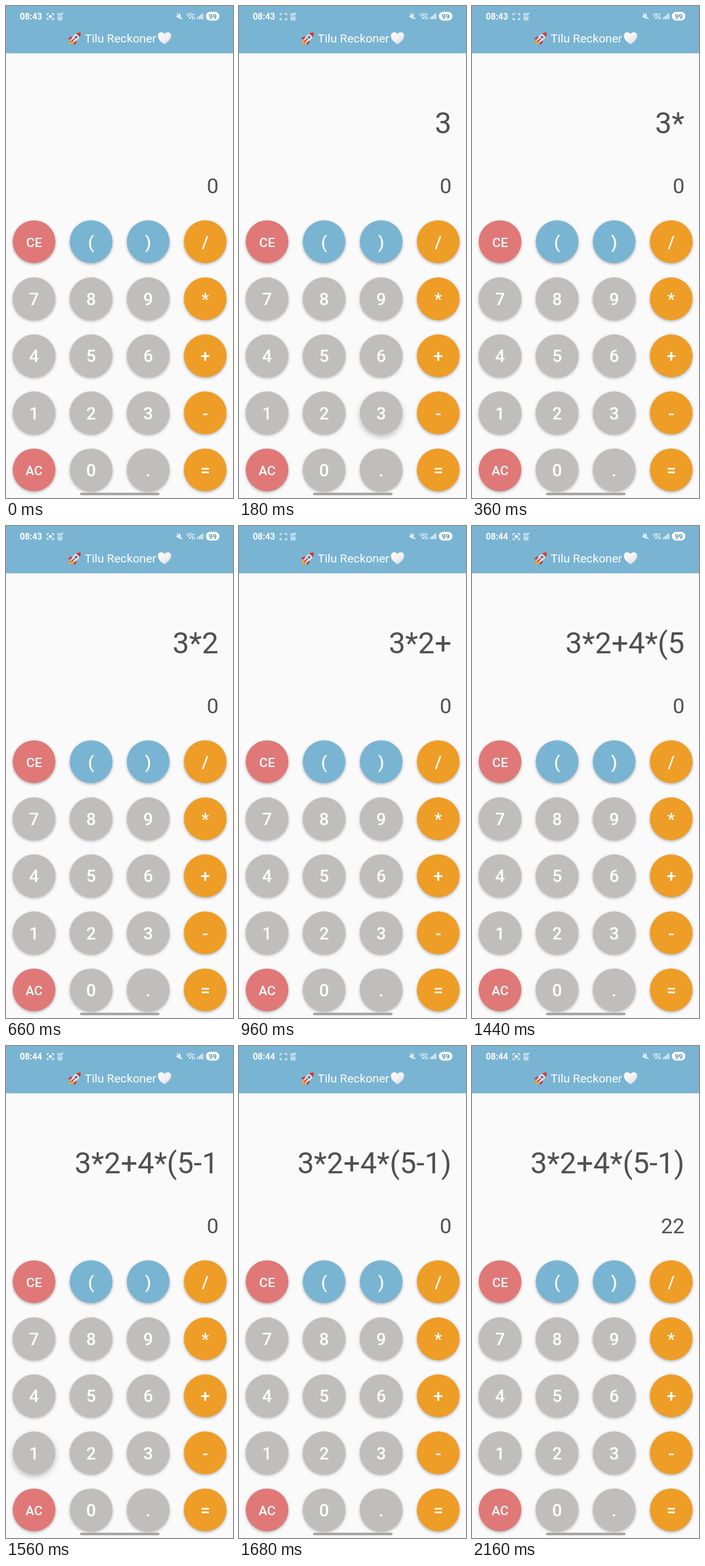
Animation, 368 px wide and 796 px high, one loop 2280 ms. Source, as an HTML page with a canvas:

```html
<!DOCTYPE html>
<html lang="en">
<head>
<meta charset="utf-8">
<title>Tilu Reckoner</title>
<style>
html, body { margin: 0; width: 100%; height: 100%; overflow: hidden; background: #fafafa; }
canvas { display: block; width: 368px; height: 796px; }
</style>
</head>
<body>
<canvas id="stage"></canvas>
<script>
const W = 368, H = 796, LOOP = 2280, STEP = 60;
const BLUE = '#79b4d3', RED = '#e07878', GREY = '#c0bdbd', ORANGE = '#ee9d26', INK = '#505050';
const ROWS = [['CE', '(', ')', '/'], ['7', '8', '9', '*'], ['4', '5', '6', '+'], ['1', '2', '3', '-'], ['AC', '0', '.', '=']];
const PRESSES = [['3', 180], ['*', 300], ['2', 600], ['+', 780], ['4', 1020], ['*', 1140],
  ['(', 1260], ['5', 1380], ['-', 1500], ['1', 1560], [')', 1620], ['=', 1860]];
const RESULT = '22', CLOCK_TICK = 1080, BLINK = 720;

const canvas = document.getElementById('stage');
const c = canvas.getContext('2d');
const dpr = window.devicePixelRatio || 1;
canvas.width = W * dpr;
canvas.height = H * dpr;

function text(str, x, y, size, color, weight = 400, align = 'left') {
  c.font = `${weight} ${size}px Roboto, sans-serif`;
  c.textAlign = align;
  c.fillStyle = color;
  c.fillText(str, x, y);
}

function disc(x, y, r, color) {
  c.fillStyle = color;
  c.beginPath();
  c.arc(x, y, r, 0, Math.PI * 2);
  c.fill();
}

function pill(x, y, w, h, r, color) {
  c.fillStyle = color;
  c.beginPath();
  c.roundRect(x, y, w, h, r);
  c.fill();
}

function shape(d, color) {
  c.fillStyle = color;
  c.fill(new Path2D(d));
}

function line(d, width = 1.2, color = '#fff') {
  c.lineWidth = width;
  c.strokeStyle = color;
  c.stroke(new Path2D(d));
}

function rocket() {
  c.save();
  c.translate(112, 52);
  c.rotate(Math.PI / 4);
  shape('M-3 6 Q-4 11 0 14 Q4 11 3 6Z', '#f5a02a');
  shape('M-1.5 6 Q-2 9 0 11 Q2 9 1.5 6Z', '#ffe067');
  shape('M-3.5 0 Q-8 3 -7 9 L-3 6Z M3.5 0 Q8 3 7 9 L3 6Z', '#d53636');
  shape('M0 -13 Q5.5 -7 4.5 1 L3 7 H-3 L-4.5 1 Q-5.5 -7 0 -13Z', '#dfe0e6');
  shape('M0 -13 Q3.4 -10 4.4 -6 Q0 -8 -4.4 -6 Q-3.4 -10 0 -13Z', '#d53636');
  shape('M-.9 1 H.9 V9 H-.9Z', '#b62b33');
  disc(0, -2.2, 2.2, '#7c8491');
  disc(0, -2.2, 1.3, '#3f5a78');
  c.restore();
}

function heart() {
  const g = c.createLinearGradient(250, 43, 264, 62);
  g.addColorStop(0, '#fdfdfd');
  g.addColorStop(.55, '#f1eff1');
  g.addColorStop(1, '#d5d3d8');
  shape('M257 62 C251 58 246.3 54 246.3 48.5 C246.3 44.5 249 42.6 251.8 42.6 C254.3 42.6 256.2 44 257 46 ' +
    'C257.8 44 259.7 42.6 262.2 42.6 C265 42.6 267.7 44.5 267.7 48.5 C267.7 54 263 58 257 62Z', g);
}

function statusBar(t) {
  text(t < CLOCK_TICK ? '08:43' : '08:44', 22.5, 21.5, 14, '#fff', 700);
  c.lineCap = c.lineJoin = 'round';

  line('M66.8 14.8V12.4H69.4 M74.4 12.4H77V14.8 M77 19.4V21.8H74.4 M69.4 21.8H66.8V19.4', 1.3);
  const phase = t % BLINK;
  if (phase < 180 || phase >= 540) pill(69.3, 14.7, 5.2, 4.8, 1.8, '#fff');

  for (const [x, y] of [[85.4, 13.2], [89.4, 13.2], [85.6, 18.5], [89.6, 18.5], [85.6, 21.8], [89.6, 21.8]]) {
    c.lineWidth = .9;
    c.strokeStyle = '#fff';
    c.beginPath();
    c.arc(x, y, 1.5, 0, Math.PI * 2);
    c.stroke();
  }
  line('M90.5 14.5L92.6 10.8 M84.5 16L87 14.5', .9);

  // muted speaker
  shape('M276.8 14.8H279.2L283 11.8V21.4L279.2 18.4H276.8Z', '#fff');
  line('M277 12L286 21.2', 1.9, BLUE);
  line('M277.4 11.8L286 20.8', 1.1);

  // wireless with arrows
  line('M293.2 14.6Q298.3 9.8 303.4 14.6 M295 16.9Q298.3 13.8 301.6 16.9', 1.2);
  disc(298.3, 19.4, 1.4, '#fff');
  line('M302.4 21.5V17.2L301.3 18.4 M305 17V21.4L306.2 20.2 M304.8 12V14.5', 1);

  for (let i = 0; i < 4; i++) {
    const h = 3 + i * 2.2;
    pill(309.8 + i * 2.7, 21.3 - h, 1.6, h, .5, '#fff');
  }

  pill(324, 9.6, 22, 13.8, 6.9, '#fff');
  text('99', 335, 20.6, 11.5, '#5d9dbf', 700, 'center');
}

function keyColor(row, col) {
  if (col === 3) return ORANGE;
  if (col === 0 && (row === 0 || row === 4)) return RED;
  return row === 0 ? BLUE : GREY;
}

function key(label, row, col, raised) {
  const x = 45.5 + col * 92.5, y = 381.3 + row * 92.3;
  c.save();
  c.shadowColor = raised ? 'rgba(0,0,0,.25)' : 'rgba(0,0,0,.3)';
  c.shadowOffsetY = (raised ? 4 : 1.8) * dpr;
  c.shadowBlur = (raised ? 8 : 4) * dpr;
  disc(x, y, 34.6, keyColor(row, col));
  c.restore();
  const wide = label.length > 1;
  text(label, x, y + (wide ? 8.5 : 10.5), wide ? 21 : 28, '#fff', 500, 'center');
}

function draw(t) {
  c.setTransform(dpr, 0, 0, dpr, 0, 0);
  c.fillStyle = '#fafafa';
  c.fillRect(0, 0, W, H);
  c.fillStyle = BLUE;
  c.fillRect(0, 0, W, 76.5);

  statusBar(t);
  rocket();
  text('Tilu Reckoner', 127.5, 58.8, 19.2, '#fff');
  heart();

  const done = PRESSES.filter(p => t >= p[1]);
  const solved = done.length === PRESSES.length;
  const typed = done.map(p => p[0]).join('').replace('=', '');
  text(typed, 344.5, 206, 48, INK, 400, 'right');
  text(solved ? RESULT : '0', 344.5, 302.8, 34, INK, 400, 'right');

  const last = done[done.length - 1];
  const active = last && t - last[1] < STEP ? last[0] : null;
  ROWS.forEach((labels, row) => labels.forEach((label, col) => key(label, row, col, label === active)));

  pill(120, 787.6, 129, 4, 2, '#a3a2a2');
}

const start = performance.now();
function tick() {
  const t = (performance.now() - start) % LOOP;
  draw(Math.floor(t / STEP) * STEP);
  requestAnimationFrame(tick);
}
tick();
</script>
</body>
</html>
```
